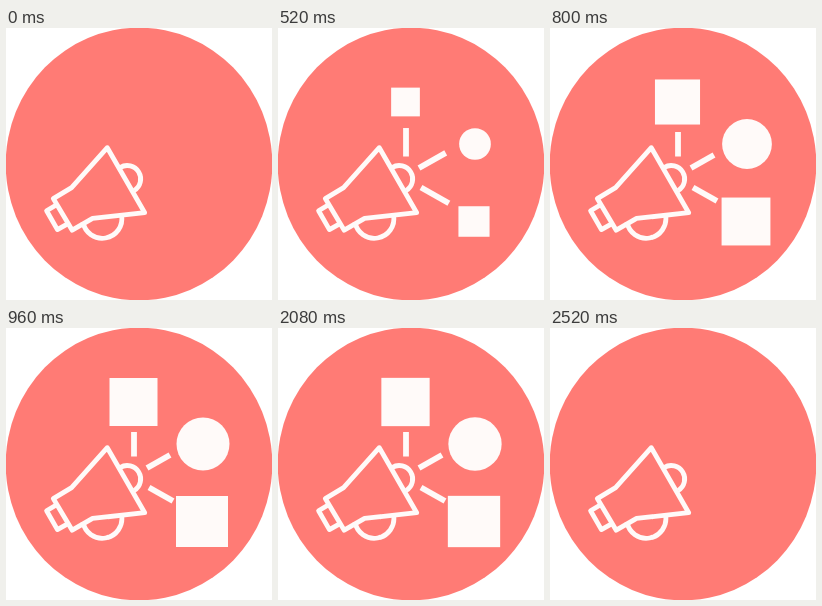
Write an HTML page that moves like this. It is 266 by 272 pixels and loops after 2880 ms.

```html
<!DOCTYPE html>
<html lang="en">
<head>
<meta charset="utf-8">
<title>Megaphone</title>
<style>
  html, body { margin: 0; width: 100%; height: 100%; overflow: hidden; background: #fff; }
  svg { display: block; width: 100vw; height: 100vh; }
</style>
</head>
<body>
<svg viewBox="0 0 266 272">
  <ellipse cx="133" cy="136" rx="133.3" ry="136.3" fill="#ff7b75"/>
  <g fill="none" stroke="#fffaf9" stroke-width="4.8" stroke-linejoin="round">
    <path d="M101.3 119.7 L65.6 159.6 L47.3 170.6 L66.2 202.2 L86.6 190.4 L138.7 184.7 Z"/>
    <path d="M50.2 177 L40.6 182.8 L51.4 201.6 L61.6 195.8"/>
    <path d="M114.2 139.5 A13 13 0 0 1 128.2 162.5"/>
    <path d="M77 194 A19.5 19.5 0 0 0 115.6 187.4"/>
  </g>
  <g id="rays" stroke="#fffaf9" stroke-width="5.8"></g>
  <g fill="#fffaf9">
    <g class="icon" data-at="127.5 74"><rect x="-24" y="-24" width="48" height="48"/></g>
    <g class="icon" data-at="197 116"><circle r="26.5"/></g>
    <g class="icon" data-at="196 193.5"><rect x="-26" y="-25.5" width="52" height="51"/></g>
  </g>
</svg>
<script>
const LOOP = 2880, EXIT = 1920, MIRROR = 2785;

// Each key is [time, size]; sizes ease along a half cosine between keys.
const rayKeys = [[285, 0], [490, 1.18], [640, 1]];
const iconKeys = [[425, 0], [610, 1.13], [770, 0.935], [960, 1]];

// Start point and full-length direction of each ray
const rays = [[128, 128.5, 0, -24.5], [141, 140, 23, -13], [143, 159.5, 24, 13.5]].map(([x, y, dx, dy]) => {
  const line = document.createElementNS('http://www.w3.org/2000/svg', 'line');
  line.setAttribute('x1', x);
  line.setAttribute('y1', y);
  document.getElementById('rays').append(line);
  return { line, x, y, dx, dy };
});
const icons = document.querySelectorAll('.icon');

function sizeAt(keys, t) {
  if (t <= keys[0][0]) return 0;
  for (let i = 1; i < keys.length; i++) {
    const [t0, a] = keys[i - 1], [t1, b] = keys[i];
    if (t < t1) return a + (b - a) * (1 - Math.cos(Math.PI * (t - t0) / (t1 - t0))) / 2;
  }
  return keys[keys.length - 1][1];
}

function draw(now) {
  const t = now % LOOP;
  // The exit plays the entrance backwards.
  const u = t < EXIT ? t : MIRROR - t;
  const ray = sizeAt(rayKeys, u), icon = sizeAt(iconKeys, u);
  for (const { line, x, y, dx, dy } of rays) {
    line.setAttribute('x2', x + dx * ray);
    line.setAttribute('y2', y + dy * ray);
    line.setAttribute('visibility', ray ? 'visible' : 'hidden');
  }
  for (const g of icons) {
    g.setAttribute('transform', `translate(${g.dataset.at}) scale(${icon})`);
  }
}

const start = performance.now();
function tick() {
  draw(performance.now() - start);
  requestAnimationFrame(tick);
}
tick();
</script>
</body>
</html>
```
